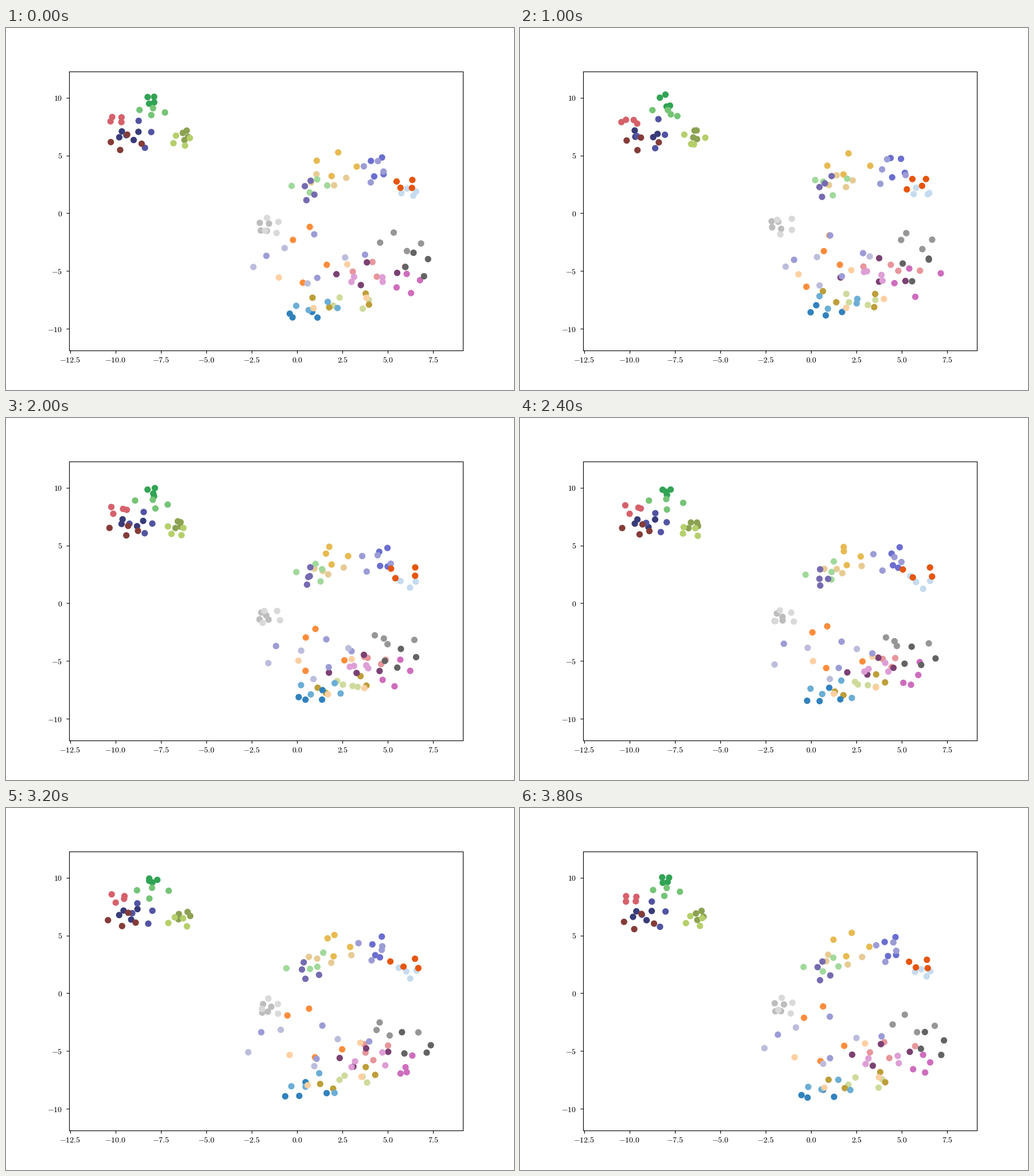
Write a matplotlib script that moves like this. It is 885 by 632 pixels and loops after 4 s.

```python
import numpy as np
import matplotlib.pyplot as plt
from matplotlib.animation import FuncAnimation

W, H, DPI = 885, 632, 100
FRAMES, INTERVAL = 20, 200
DOTS = 4  # per cluster

plt.rcParams['mathtext.fontset'] = 'cm'
rng = np.random.default_rng(7)

islands, colors = [], []


def island(centre, squeeze, wander, clusters):
    """Clusters are (color, x, y, rx, ry) in pixels. Dots sit around each
    ellipse, wander on their own loops and close in on the island's centre."""
    home = []
    for color, x, y, rx, ry in clusters:
        a = 2 * np.pi * (np.arange(DOTS) + rng.random()) / DOTS
        a += rng.uniform(-0.3, 0.3, DOTS)
        home.append(np.column_stack([x + rx * np.cos(a), y + ry * np.sin(a)]))
        colors.extend([color] * DOTS)
    home = np.vstack(home)
    reach = wander * np.array([1, 0.6])
    inward = squeeze * (home - centre) / 2
    swing = inward + rng.uniform(-0.5, 0.5, home.shape) * reach
    sway = rng.uniform(-1, 1, home.shape) * reach
    islands.append((home, swing, sway))


def positions(frame):
    a = 2 * np.pi * frame / FRAMES
    px = np.vstack([home + swing * (np.cos(a) - 1) + sway * np.sin(a)
                    for home, swing, sway in islands])
    return (px - (507.6, 323.3)) / (31.63, -20.17)


# Upper left
island((240, 170), 0.1, 9, [
    ('#393b79', 216, 187, 20, 9),
    ('#5254a3', 232, 187, 22, 25),
    ('#8ca252', 313, 187, 5, 9),
    ('#b5cf6b', 306, 196, 16, 10),
    ('#843c39', 210, 200, 27, 14),
    ('#d6616b', 193, 160, 12, 6),
    ('#31a354', 253, 125, 7, 8),
    ('#74c476', 254, 146, 24, 6),
])

# Upper right
island((670, 260), 0.1, 12, [
    ('#6b6ecf', 648, 242, 14, 19),
    ('#9c9cd6', 640, 250, 18, 20),
    ('#c6dbef', 702, 287, 13, 7),
    ('#e6550d', 698, 272, 20, 8),
])

# Upper middle
island((555, 262), 0.3, 15, [
    ('#e7ba52', 576, 238, 36, 21),
    ('#e7cb94', 561, 264, 33, 11),
    ('#a1d99b', 529, 275, 31, 12),
    ('#756bb1', 529, 285, 9, 19),
])

# Lower right
island((600, 440), 0.25, 22, [
    ('#cedb9c', 602, 480, 34, 12),
    ('#bd9e39', 588, 474, 55, 15),
    ('#e7969c', 650, 421, 48, 13),
    ('#7b4173', 629, 429, 53, 20),
    ('#ce6dbd', 701, 446, 22, 17),
    ('#de9ed6', 629, 439, 36, 6),
    ('#3182bd', 522, 501, 30, 6),
    ('#6baed6', 544, 485, 38, 8),
    ('#fd8d3c', 528, 397, 33, 50),
    ('#fdd0a2', 556, 449, 85, 41),
    ('#9c9cd6', 540, 398, 86, 38),
    ('#bcbddc', 515, 414, 84, 32),
    ('#636363', 717, 414, 21, 23),
    ('#969696', 688, 373, 36, 17),
])

# Pale greys
island((447, 360), 0.1, 9, [
    ('#bdbdbd', 450, 346, 10, 9),
    ('#d9d9d9', 463, 345, 13, 17),
])

fig, ax = plt.subplots(figsize=(W / DPI, H / DPI), dpi=DPI)
fig.subplots_adjust(left=0.1245, right=0.8995, bottom=0.1095, top=0.88)
ax.set(xlim=(-12.55, 9.13), ylim=(-11.86, 12.27),
       xticks=np.arange(-12.5, 8, 2.5), yticks=np.arange(-10, 11, 5))
ax.xaxis.set_major_formatter(lambda v, _: f'${v:.1f}$')
ax.yaxis.set_major_formatter(lambda v, _: f'${v:.0f}$')
ax.tick_params(axis='x', pad=4)
ax.tick_params(axis='y', pad=5)

dots = ax.scatter(*positions(0).T, s=50, c=colors)


def draw(frame):
    dots.set_offsets(positions(frame))
    return dots,


anim = FuncAnimation(fig, draw, frames=FRAMES, interval=INTERVAL,
                     repeat=True, repeat_delay=0)
plt.show()
```
